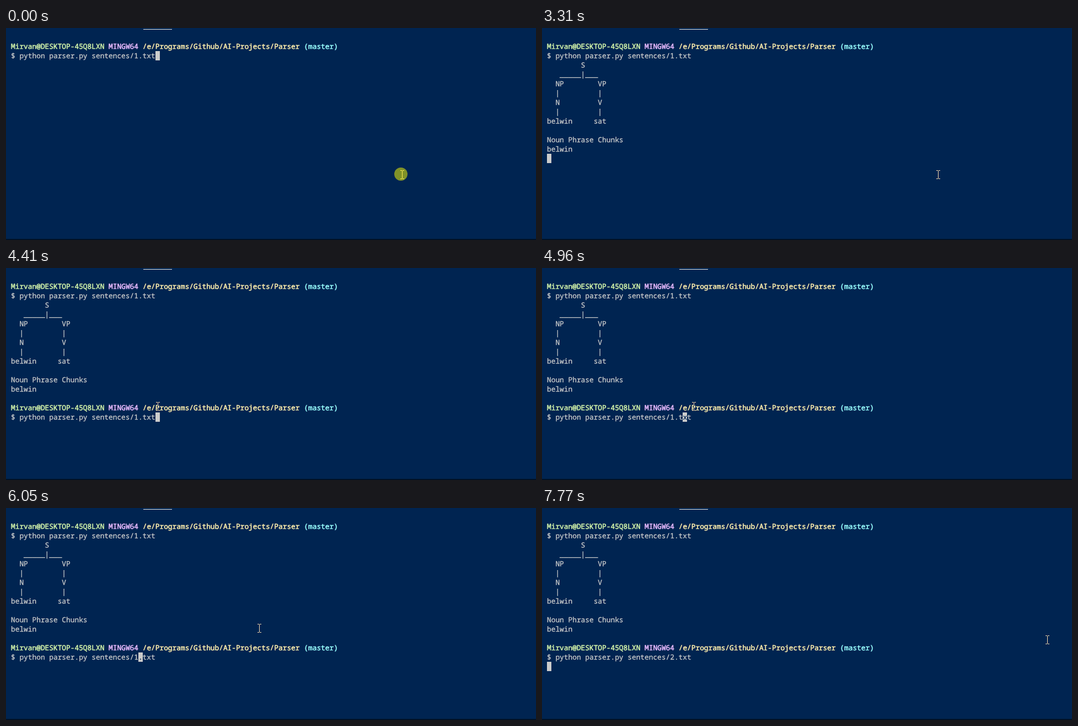
Write an HTML page that moves like this. It is 961x386 px and loops after 8000 ms.

```html
<!DOCTYPE html>
<html lang="en">
<head>
<meta charset="utf-8">
<title>Terminal</title>
<style>
  html, body { margin: 0; width: 100%; height: 100%; overflow: hidden; background: #002451; }
  svg { display: block; }
  text {
    font: 12.8333px "Noto Sans Mono", "DejaVu Sans Mono", monospace;
    font-variant-ligatures: none;
    text-rendering: geometricPrecision;
    white-space: pre;
    color: #ccc;
    fill: currentColor;
    stroke: currentColor;
    stroke-width: .3px;
  }
  .user, .host, .path, .branch { stroke-width: .55px; }
  .user { color: #d1f1a9; }
  .host { color: #ebbbff; }
  .path { color: #ffeead; }
  .branch { color: #9ff; }
  #under { color: #002451; }
  #mouse { mix-blend-mode: difference; }
</style>
</head>
<body>
<svg width="961" height="386" viewBox="0 0 961 386">
  <rect width="961" height="386" fill="#002451"/>
  <rect x="249" y="2" width="52" height="1" fill="#e7e7e7"/>
  <rect y="384" width="961" height="2" fill="#001126"/>
  <g id="first"></g>
  <g id="output"></g>
  <g id="second"></g>
  <rect id="cursor" width="8" height="17" fill="#ccc"/>
  <text id="under"></text>
  <path id="mouse" d="M-3-7.5h3m1 0h3M.5-7v14M-3 7.5h3m1 0h3" fill="none" stroke="#fff" shape-rendering="crispEdges"/>
  <circle id="click" cx="716" cy="266" r="12" fill="#ff0" fill-opacity=".5"/>
</svg>
<script>
const LOOP = 8000, COL = 7.7, ROW = 17;
const colX = col => 9 + col * COL;
const rowY = row => 25 + row * ROW;
const $ = id => document.getElementById(id);

// Moments of the session, in ms
const RELEASE = 70, RUN = 590, RESULT = 3310, READY = 3480, RECALL = 4410,
      ERASE = 6750, RETYPE = 7450, RERUN = 7770;
const LEFT_KEYS = [4730, 4960, 5190, 5340];

// Pointer moves: each eases to its end in a few visible hops
const HOP = 75;
const HOME = { x: 718, y: 267 };
const MOVES = [
  { start: READY, hops: 3, x: 275, y: 252 },
  { start: 6050, hops: 1, x: 459, y: 219 },
  { start: 6120, hops: 1, x: 511, y: 219 },
  { start: 6350, hops: 2, x: 916, y: 240 }
];

const PROMPT = {
  user: 'Mirvan@DESKTOP-45Q8LXN',
  host: 'MINGW64',
  path: '/e/Programs/Github/AI-Projects/Parser',
  branch: '(master)'
};
const OUTPUT = [
  '        S',
  '   _____|___',
  '  NP        VP',
  '  |         |',
  '  N         V',
  '  |         |',
  'belwin     sat',
  '',
  'Noun Phrase Chunks',
  'belwin'
];
const command = n => `$ python parser.py sentences/${n}.txt`;

function place(el, row, col) {
  el.setAttribute('x', colX(col));
  el.setAttribute('y', rowY(row) + 13);
}

function addText(group, row, col, str, cls = '') {
  const el = document.createElementNS('http://www.w3.org/2000/svg', 'text');
  el.setAttribute('class', cls);
  el.textContent = str;
  place(el, row, col);
  $(group).append(el);
  return el;
}

function addPrompt(group, row) {
  let col = 0;
  for (const [cls, str] of Object.entries(PROMPT)) {
    addText(group, row, col, str, cls);
    col += str.length + 1;
  }
}

addPrompt('first', 0);
addText('first', 1, 0, command(1));
OUTPUT.forEach((line, i) => addText('output', 2 + i, 0, line));
addPrompt('second', 13);
const typed = addText('second', 14, 0, '');

function typedAt(t) {
  if (t < RECALL) return '$ ';
  if (t < ERASE) return command(1);
  return command(t < RETYPE ? '' : 2);
}

function cursorAt(t) {
  if (t < RUN) return [1, command(1).length];
  if (t < RESULT) return [2, 0];
  if (t < READY) return [12, 0];
  if (t >= RERUN) return [15, 0];
  // Left keys and the erased digit count back from the end of the recalled line
  const back = LEFT_KEYS.filter(key => key <= t).length + (t >= ERASE && t < RETYPE);
  return [14, t < RECALL ? 2 : command(1).length - back];
}

function mouseAt(t) {
  let { x, y } = HOME;
  for (const move of MOVES) {
    if (t < move.start) break;
    const hop = Math.min(move.hops, Math.floor((t - move.start) / HOP) + 1);
    const ease = 1 - (1 - hop / move.hops) ** 2;
    x += (move.x - x) * ease;
    y += (move.y - y) * ease;
  }
  return [Math.round(x), Math.round(y)];
}

const show = (id, on) => $(id).setAttribute('visibility', on ? 'visible' : 'hidden');

function draw(t) {
  const [row, col] = cursorAt(t);
  const line = typedAt(t);

  show('output', t >= RESULT);
  show('second', t >= READY);
  show('click', t < RELEASE);
  typed.textContent = line;

  $('cursor').setAttribute('x', Math.round(colX(col)));
  $('cursor').setAttribute('y', rowY(row));
  $('under').textContent = row === 14 ? line.charAt(col) : '';
  place($('under'), row, col);
  $('mouse').setAttribute('transform', `translate(${mouseAt(t)})`);
}

const start = performance.now();
function tick() {
  draw((performance.now() - start) % LOOP);
  requestAnimationFrame(tick);
}
tick();
</script>
</body>
</html>
```
